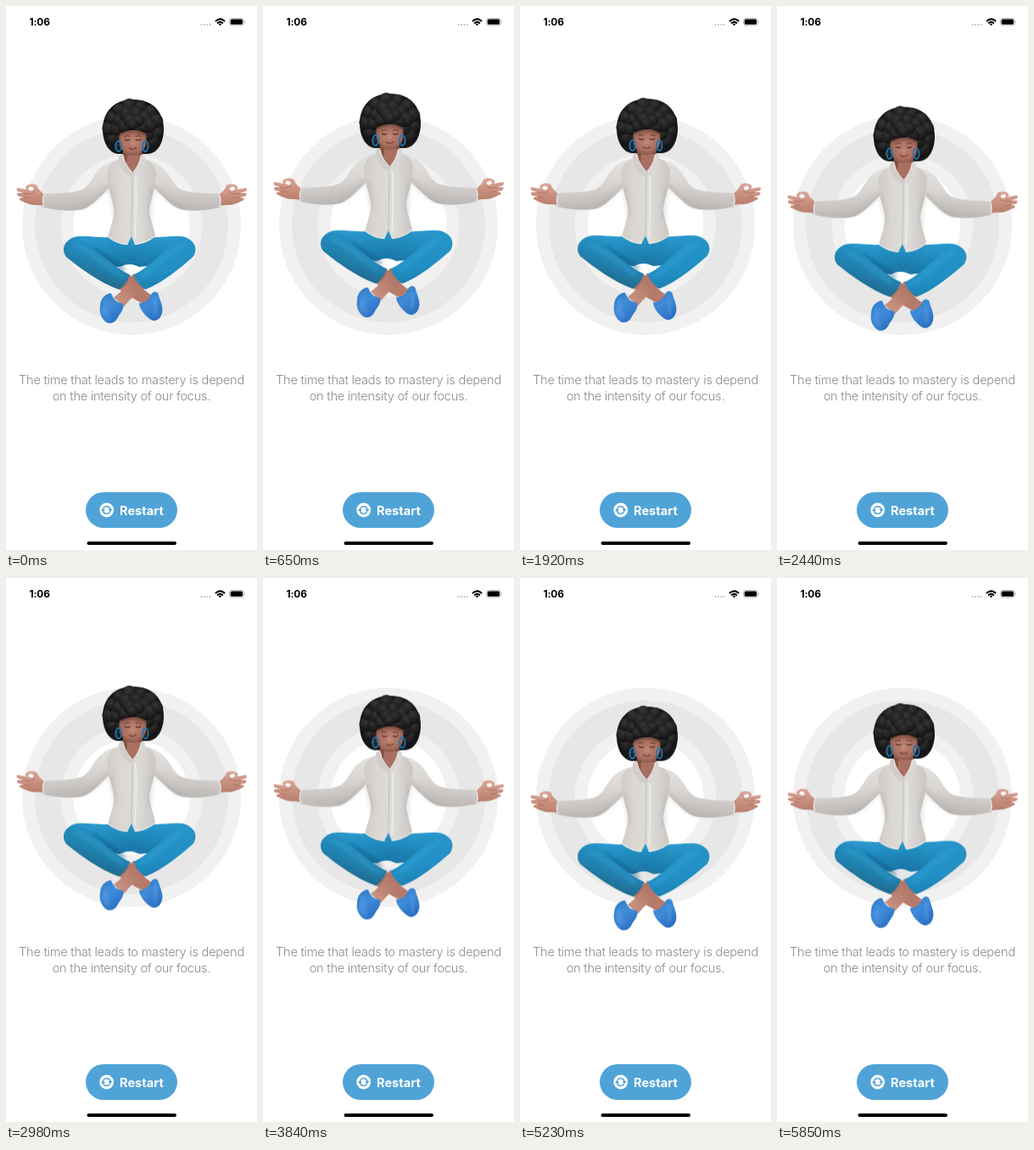
Animation, 296 px wide and 640 px high, one loop 5880 ms. Source, as an HTML page:

```html
<!DOCTYPE html>
<html lang="en">
<head>
<meta charset="utf-8">
<title>Restart</title>
<style>
  html, body { margin: 0; width: 100%; height: 100%; overflow: hidden; background: #fff; }
  svg { display: block; width: 100%; height: 100%; }
  text { font-family: Inter, Roboto, sans-serif; }
  .quote { font-size: 14.6px; font-weight: 300; letter-spacing: -.25px; fill: #8b8b90; text-anchor: middle; }
  .label { font-size: 14.6px; font-weight: 700; fill: #fff; }
  .clock { font-size: 11.8px; font-weight: 700; letter-spacing: -.1px; }
  .line { fill: none; stroke-linecap: round; stroke-linejoin: round; }
  .shade { opacity: .5; filter: url(#soft); }

  /* Ease-out drift up, then down, shown at about nine pictures per second. */
  #figure { animation: float 5880ms steps(3, end) infinite; }
  @keyframes float {
    0%     { transform: translateY(0); animation-timing-function: step-end; }
    2.04%  { transform: translateY(-1.5px); }
    7.4%   { transform: translateY(-5px); }
    12.76% { transform: translateY(-7.9px); }
    18.2%  { transform: translateY(-9.5px); }
    23.64% { transform: translateY(-10px); }
    29.05% { transform: translateY(-5px); }
    34.35% { transform: translateY(1.1px); animation-timing-function: steps(6, end); }
    45.07% { transform: translateY(12.5px); animation-timing-function: steps(6, end); }
    56.29% { transform: translateY(22.8px); animation-timing-function: steps(6, end); }
    67.35% { transform: translateY(31.4px); animation-timing-function: steps(6, end); }
    77.89% { transform: translateY(38px); animation-timing-function: steps(6, end); }
    88.95% { transform: translateY(41.3px); }
    94.22% { transform: translateY(41.6px); }
    99.49%, 100% { transform: translateY(38.5px); animation-timing-function: step-end; }
  }
</style>
</head>
<body>
<svg viewBox="0 0 296 640">
  <defs>
    <radialGradient id="curl" cx=".45" cy=".3" r=".7">
      <stop offset="0" stop-color="#363636"/><stop offset=".55" stop-color="#232323"/><stop offset="1" stop-color="#121212"/>
    </radialGradient>
    <radialGradient id="skin" cx=".5" cy=".45" r=".65">
      <stop offset="0" stop-color="#bd8473"/><stop offset=".6" stop-color="#a96f60"/><stop offset="1" stop-color="#7b4a40"/>
    </radialGradient>
    <linearGradient id="hand" x2="0" y2="1">
      <stop offset="0" stop-color="#dba595"/><stop offset="1" stop-color="#b87d6d"/>
    </linearGradient>
    <linearGradient id="ankle" x1="1" x2="0" y2="1">
      <stop offset="0" stop-color="#a5695b"/><stop offset="1" stop-color="#cf9988"/>
    </linearGradient>
    <linearGradient id="sleeve" x2=".15" y2="1">
      <stop offset="0" stop-color="#e6e4e1"/><stop offset=".55" stop-color="#d9d6d3"/><stop offset="1" stop-color="#bbb8b5"/>
    </linearGradient>
    <linearGradient id="shirt">
      <stop offset="0" stop-color="#cfccc8"/><stop offset=".25" stop-color="#dad7d3"/><stop offset=".6" stop-color="#dfddda"/>
      <stop offset="1" stop-color="#c9c6c3"/>
    </linearGradient>
    <linearGradient id="thigh" x2="0" y2="1">
      <stop offset="0" stop-color="#2c9ace"/><stop offset=".5" stop-color="#208abd"/><stop offset="1" stop-color="#1a75a5"/>
    </linearGradient>
    <linearGradient id="darkShin" x1=".6" y1=".2" x2=".3" y2=".85">
      <stop offset="0" stop-color="#238fc2"/><stop offset=".5" stop-color="#2180ad"/><stop offset="1" stop-color="#1f6585"/>
    </linearGradient>
    <linearGradient id="lightShin" x1=".6" y1=".1" x2=".35" y2="1">
      <stop offset="0" stop-color="#2795c9"/><stop offset=".6" stop-color="#218fc3"/><stop offset="1" stop-color="#1b7aab"/>
    </linearGradient>
    <linearGradient id="shoe" x2=".6" y2="1">
      <stop offset="0" stop-color="#2d77c6"/><stop offset=".5" stop-color="#408cd9"/><stop offset="1" stop-color="#2b70c2"/>
    </linearGradient>
    <filter id="soft" x="-50%" y="-50%" width="200%" height="200%"><feGaussianBlur stdDeviation="2.4"/></filter>

    <g id="arm">
      <path fill="url(#hand)" d="M45 222 C41 218 38 216 37 212 C35 209 29 209 25 211 C22 213 23 215 25 216 L14 214 C12 214 12 217 14 218 L20 220 L14 220 C12 221 13 223 15 224 L21 225 L17 226 C15 227 16 229 18 229 C23 232 31 235 36 234 L46 235 Z"/>
      <ellipse cx="29.5" cy="215" rx="3.2" ry="2.4" fill="#f5f5f5" transform="rotate(12 29.5 215)"/>
      <path class="line" stroke="#a96d5e" stroke-width=".8" d="M21 220 L27 222 M21 225 L28 226 M33 218 C32 221 29 221 27 220"/>
      <path fill="url(#sleeve)" d="M134 181 C122 182 112 188 105 198 C100 206 96 213 90 216 C77 221 59 220 45 221 C42 225 42 232 44 237 C58 240 74 242 87 240 C100 238 111 224 124 212 Z"/>
      <path class="line" stroke="#f2f1ef" stroke-width="1" d="M45 222 C43 227 43 232 45 236"/>
      <path class="line shade" stroke="#aaa6a3" stroke-width="3" d="M90 237 C104 231 113 220 122 211"/>
    </g>

    <path id="thighs" fill="url(#thigh)" d="M121 272 C107 273 92 269 80 272 C67 277 65 288 72 296 L106 304 L134 307 C140 304 146 303 150 304 V270 Z"/>
    <g id="leg">
      <path class="line shade" stroke="#0d4f7c" stroke-width="5" d="M100 286 C115 293 128 302 138 310"/>
      <path d="M80 273 C68 277 65 289 72 296 C88 309 110 325 133 333.500 C139 330 144 323 146 316 C132 310 119 298 104 286 C97 279 89 273 80 273 Z"/>
      <path class="line shade" stroke="#3aa9da" stroke-width="4" d="M82 281 C96 286 114 302 135 317"/>
    </g>
  </defs>

  <rect width="296" height="640" fill="#fff"/>

  <g id="status">
    <text class="clock" x="27.5" y="23">1:06</text>
    <path class="line" stroke="#b5b5b5" stroke-width="1.9" stroke-dasharray="0 3.4" d="M230.5 22 H242"/>
    <g class="line" stroke="#000" stroke-width="2">
      <path d="M247.6 17.6 Q252.5 13.2 257.4 17.6"/>
      <path d="M249.7 19.9 Q252.5 17.5 255.3 19.9"/>
    </g>
    <path d="M250.7 21.3 Q252.5 19.9 254.3 21.3 L252.5 23.2 Z"/>
    <rect x="263.5" y="14.4" width="16.8" height="8.6" rx="2.6" fill="none" stroke="#aaa" stroke-width=".8"/>
    <rect x="264.7" y="15.6" width="14.4" height="6.2" rx="1.6"/>
    <path d="M281.3 17.2 Q283 18.7 281.3 20.2 Z" fill="#aaa"/>
  </g>

  <g fill="none" stroke="#8e8e8e">
    <circle cx="148" cy="258" r="98.7" stroke-width="60.7" stroke-opacity=".125"/>
    <circle cx="148" cy="258" r="98.7" stroke-width="30.4" stroke-opacity=".1"/>
  </g>

  <g id="figure">
    <use href="#thighs"/>
    <use href="#thighs" transform="translate(291.5 0) scale(-1 1)"/>
    <path fill="url(#thigh)" d="M121 268 H174 L172 286 L149 302 L122 286 Z"/>
    <path class="line shade" stroke="#125f90" stroke-width="4" d="M148 284 V300"/>

    <path fill="#b67a6b" d="M133 333 L146 316 C154 327 165 336 174 342 L163 351 C153 346 142 339 133 333 Z"/>
    <path fill="url(#shoe)" d="M157 349 C161 351 168 347 171 340 C173 335 179 335 180 340 C182 348 187 356 183 364 C180 371 173 372 168 367 C162 362 157 355 157 349 Z"/>
    <path class="line shade" stroke="#7eb6ee" stroke-width="3" d="M175 346 C178 353 178 358 176 363"/>
    <use href="#leg" fill="url(#darkShin)"/>
    <path class="line shade" stroke="#7d493e" stroke-width="3" d="M140 331 L149 321"/>
    <path fill="url(#ankle)" d="M150 315 L165 332 C154 337 146 345 139 354 L127 343 C137 336 144 326 150 315 Z"/>
    <g transform="translate(297.500 0) scale(-1 1)">
      <path fill="url(#lightShin)" d="M87 273 C75 277 71 289 78 296 C93 309 112 325 133 333.500 C139 330 145 323 147 316 C133 310 122 298 108 286 C102 279 95 273 87 273 Z"/>
      <path class="line shade" stroke="#3aa9da" stroke-width="4" d="M89 281 C100 286 116 302 136 317"/>
    </g>
    <path fill="url(#shoe)" d="M111 353 C111 345 117 338 124 338 C126 345 132 350 138 350 C140 356 135 361 132 366 C128 375 119 375 115 369 C111 364 110 359 111 353 Z"/>
    <path class="line shade" stroke="#7eb6ee" stroke-width="3" d="M118 347 C115 354 117 362 121 367"/>

    <use href="#arm"/>
    <use href="#arm" transform="translate(296.5 0) scale(-1 1)"/>
    <path fill="url(#shirt)" d="M134 180 C126 182 121 188 119 196 L121 212 C123 226 129 236 127 246 C125 256 122 264 120 272 C126 277 136 281 143 281 L148 271 L152 281 C162 280 171 276 176 271 C175 262 170 250 169 242 C169 232 174 222 175 212 L177 196 C175 188 171 182 163 180 Z"/>
    <path class="line shade" stroke="#a5a19e" stroke-width="3" d="M123 214 C125 228 130 237 128 247 M173 214 C170 228 168 237 170 250"/>
    <path class="line" stroke="#efeeec" stroke-width="1" d="M120.500 271.500 C127 277 136 280 143 280.300 M152.500 280.300 C162 279 170 275.500 175.500 270.500"/>
    <path class="line" stroke="#b9b6b3" stroke-width=".8" d="M149 197 C149 222 148 250 148 271"/>
    <path class="line" stroke="#f4f3f1" stroke-width="1.1" d="M152.500 196 C154.500 222 153 250 152 273"/>

    <g id="hair">
      <path fill="#161616" d="M150 110 C174 110 186 126 186 145 C186 160 179 174 167 174 H132 C121 173 114 160 114 145 C114 126 126 110 150 110 Z"/>
    </g>
    <path fill="#85503f" d="M138 168 H160 L163 184 L149 197 L137 186 Z"/>
    <path fill="#a96f60" d="M143 175 H158 L159 184 L149.500 195 L142 186 Z"/>
    <path fill="url(#skin)" d="M134 150 C139 148 144 146 150 146 C156 146 161 148 165 150 C166 157 166 164 162 169 C158 174 154 176 149.500 176 C145 176 140 174 137 169 C133 164 133 157 134 150 Z"/>
    <path class="line shade" stroke="#1a0f0c" stroke-width="3" d="M134 150 C144 145 155 145 165 150"/>
    <g class="line" stroke="#2c1712">
      <path stroke-width="1" d="M140.300 157 Q143 159.600 146 157.400 M153.200 157.400 Q156 159.600 159 157"/>
      <path stroke-width=".8" opacity=".75" d="M139.600 153.600 Q142.500 151.800 146 153 M153.300 153 Q157 151.800 159.700 153.600"/>
      <path stroke="#76362f" stroke-width="1.1" d="M145.500 167 Q149.500 170 153.700 166.800"/>
    </g>
    <ellipse cx="149.600" cy="162" rx="2.300" ry="1.800" fill="#c98976"/>
    <g class="line" stroke="#1d78b4" stroke-width="1.8">
      <ellipse cx="132.700" cy="165" rx="3.300" ry="6"/>
      <ellipse cx="164.300" cy="165" rx="3.300" ry="6"/>
    </g>
    <path fill="#d0cdca" d="M133 178 C134 174 137 174 138.500 176 C139.500 185 145 191 149.500 196 L147 201 C139 196 133 189 133 178 Z"/>
    <path fill="#dad7d4" d="M164 178 C163 174 160 174 159 176 C158 185 153.500 191 149.500 196 L152.500 201 C159 196 164 189 164 178 Z"/>
    <path class="line" stroke="#f3f2ef" stroke-width=".9" d="M138.300 176 C139.500 185 145 191 149.500 196 C153.500 191 158 185 159.200 176"/>
  </g>

  <text class="quote" x="148" y="445">The time that leads to mastery is depend</text>
  <text class="quote" x="148" y="464">on the intensity of our focus.</text>

  <rect x="94" y="572" width="108" height="42" rx="21" fill="#50a3d7"/>
  <circle cx="118.700" cy="593" r="8.400" fill="#fff"/>
  <g id="turn">
    <path class="line" stroke="#50a3d7" stroke-width="1.500" d="M114.900 590.800 A4.400 4.400 0 0 1 123 592"/>
    <path fill="#50a3d7" d="M120.500 592 H125.500 L123 595.300 Z"/>
  </g>
  <use href="#turn" transform="rotate(180 118.700 593)"/>
  <text class="label" x="134" y="598.500">Restart</text>
  <rect x="95.500" y="630" width="105.500" height="4" rx="2"/>
</svg>
<script>
  const hair = document.getElementById('hair');

  function curl(x, y, r) {
    const dot = document.createElementNS('http://www.w3.org/2000/svg', 'circle');
    const shape = { cx: x, cy: y, r, fill: 'url(#curl)' };
    for (const key in shape) dot.setAttribute(key, shape[key]);
    hair.append(dot);
  }

  function ring(count, rx, ry, size, turn) {
    for (let i = 0; i < count; i++) {
      const a = turn + i * 2 * Math.PI / count;
      curl(150 + rx * Math.cos(a), 142.5 + ry * Math.sin(a), size + Math.sin(i * 2.3) * .7);
    }
  }

  ring(13, 28, 25.5, 8, .2);
  ring(10, 19, 17, 8.2, .5);
  ring(6, 10, 9, 8, .1);
  curl(149, 139, 7);
</script>
</body>
</html>
```
